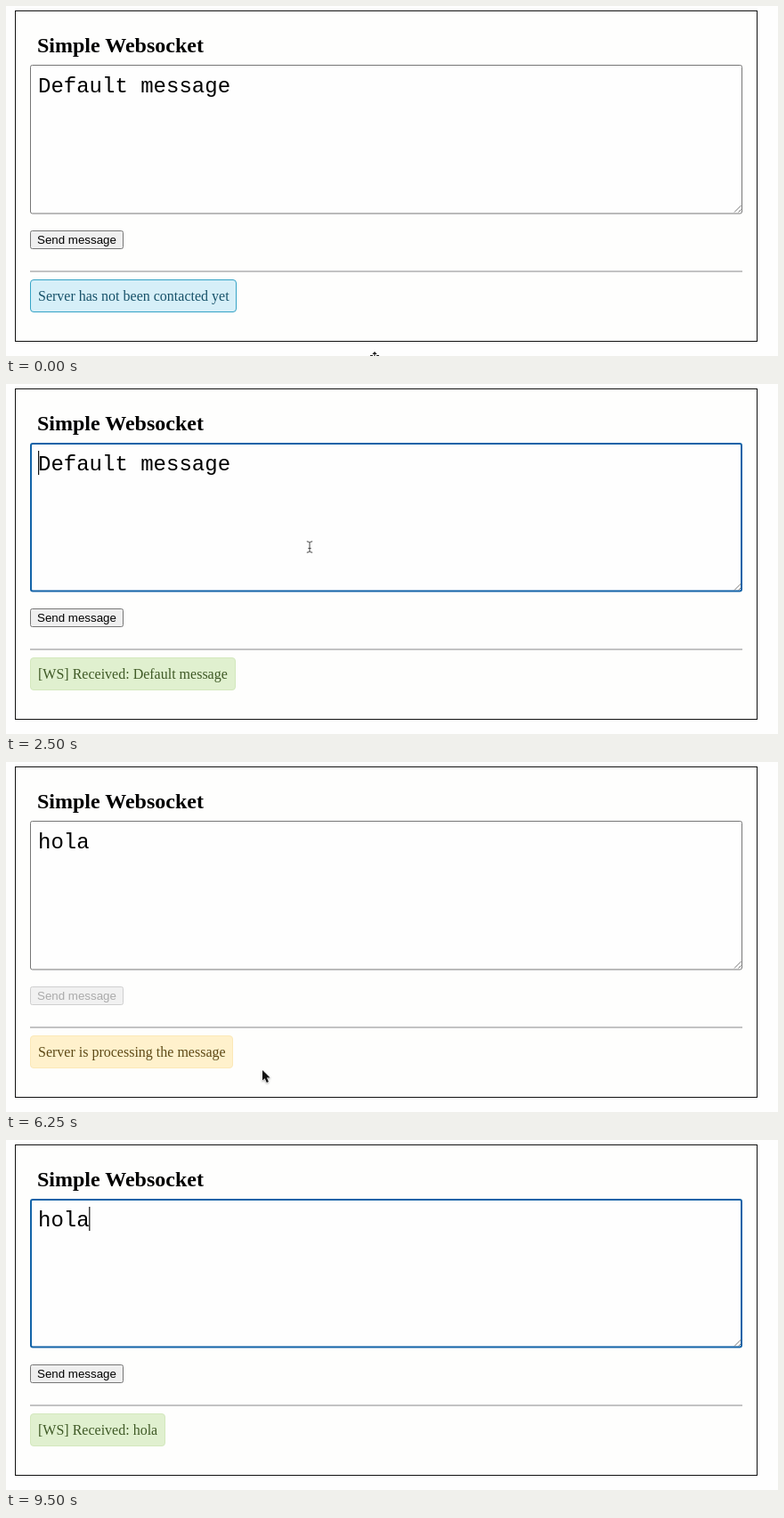
These frames come from a looping animation (867 by 393 pixels, 10000 ms). An HTML page:

```html
<!DOCTYPE html>
<html lang="en">
<head>
<meta charset="utf-8">
<title>Simple Websocket</title>
<style>
  html, body { margin: 0; width: 100%; height: 100%; overflow: hidden; background: #fefefe; }
  svg { display: block; width: 867px; height: 393px; }
  text { white-space: pre; }
  .serif { font-family: "Liberation Serif", Times, serif; }
  .mono { font: 24px "Liberation Mono", "Courier New", monospace; }
  .sans { font: 13.333px "Liberation Sans", Arial, sans-serif; }
</style>
</head>
<body>
<svg viewBox="0 0 867 393">
  <rect width="867" height="393" fill="#fefefe"/>
  <rect x="10.5" y="5.5" width="833" height="371" fill="#fefefd" stroke="#111"/>
  <text class="serif" x="35" y="52" font-size="24" font-weight="bold">Simple Websocket</text>

  <rect id="area" fill="#fefefe"/>
  <path d="M818 231.5L825.5 224M822.5 231.5L825.5 228.5" stroke="#777" fill="none"/>
  <rect id="selection" x="36" y="75" width="216" height="27" fill="#b3d7ff"/>
  <text id="message" class="mono" x="36" y="97"></text>
  <rect id="caret" y="75" width="1.2" height="27" fill="#111"/>

  <rect id="button" x="27.5" y="252.5" width="104" height="20" rx="2"/>
  <text id="label" class="sans" x="35" y="267">Send message</text>

  <rect x="27" y="297" width="800" height="2" fill="#c3c3c3"/>
  <rect id="box" x="27.5" y="307.5" height="36" rx="3.5"/>
  <text id="status" class="serif" x="36" y="331" font-size="16"></text>

  <g id="resize" fill="none" stroke="#222" stroke-width="1.2">
    <path d="M414 389V393M409 392.5H412M416 392.5H419"/>
    <path d="M411.3 391L414 388L416.7 391Z" fill="#222" stroke="none"/>
  </g>
  <path id="arrow" d="M0 0V11.6L2.7 9.2L4.8 14L6.9 13.1L4.9 8.4H8.6Z"
        fill="#111" stroke="#fff" stroke-width="1" paint-order="stroke"
        style="filter:drop-shadow(0 1px 1px #0005)"/>
  <path id="beam" d="M-3.2 -6.2Q0 -6.2 0 -4.5Q0 -6.2 3.2 -6.2M0 -4.5V4.5M-3.2 6.2Q0 6.2 0 4.5Q0 6.2 3.2 6.2M-1.6 1.5H1.6"
        fill="none" stroke="#444" stroke-width="1"/>
</svg>
<script>
const LOOP = 10000, STEP = 250;
const $ = id => document.getElementById(id);

// Pointer path: time, x, y
const path = [
  [250, 396, 372], [500, 240, 318], [750, 66, 265], [1000, 62, 263], [1250, 62, 263],
  [1500, 184, 217], [1750, 275, 193], [2250, 341, 183], [4000, 341, 183],
  [4250, 320, 190], [4500, 180, 222], [4750, 64, 261], [5000, 62, 263],
  [5250, 92, 286], [5500, 200, 329], [5750, 270, 345], [6000, 289, 347],
  [6500, 287, 345], [7000, 285, 346], [7250, 285, 346], [7500, 283, 347], [7750, 280, 349]
];

const states = {
  idle: { text: "Server has not been contacted yet", width: 231, fill: "#d6eff8", stroke: "#35a3c6", ink: "#17526a" },
  busy: { text: "Server is processing the message", width: 227, fill: "#fff1cc", stroke: "#fbe8b8", ink: "#5e4a16" },
  first: { text: "[WS] Received: Default message", width: 230, fill: "#e0f0cf", stroke: "#d3e8bd", ink: "#3f5a26" },
  second: { text: "[WS] Received: hola", width: 151, fill: "#e0f0cf", stroke: "#d3e8bd", ink: "#3f5a26" }
};

function set(id, attrs) {
  for (const k in attrs) $(id).setAttribute(k, attrs[k]);
}

function show(id, on) {
  $(id).style.display = on ? "" : "none";
}

function pointer(t) {
  if (t < path[0][0] || t >= 8000) return null;
  const i = path.findIndex(p => p[0] > t);
  if (i < 0) return path[path.length - 1].slice(1);
  const [t0, x0, y0] = path[i - 1], [t1, x1, y1] = path[i];
  const k = (t - t0) / (t1 - t0);
  return [x0 + (x1 - x0) * k, y0 + (y1 - y0) * k];
}

function stateAt(t) {
  if (t < 1000) return "idle";
  if (t < 2500) return "busy";
  if (t < 5000) return "first";
  return t < 6500 ? "busy" : "second";
}

function messageAt(t) {
  if (t < 3750) return "Default message";
  return t < 4000 ? "ho" : "hola";
}

function caretOn(t, focused) {
  if (!focused || t === 3500) return false;
  if (t >= 3750 && t < 4500) return true;
  return Math.floor((t - 2500) / 500) % 2 === 0;
}

function draw(time) {
  const t = Math.floor((time % LOOP) / STEP) * STEP;
  const state = stateAt(t), s = states[state], busy = state === "busy";
  const focused = state === "first" || state === "second";
  const pos = pointer(t), [x, y] = pos || [0, 0];
  const overArea = pos && x > 27 && x < 827 && y > 66 && y < 233;
  const overButton = pos && x > 27 && x < 132 && y > 252 && y < 273;

  set("area", focused
    ? { x: 28, y: 67, width: 798, height: 165.5, rx: 2, stroke: "#1263a8", "stroke-width": 2 }
    : { x: 27.5, y: 66.5, width: 799, height: 166.5, rx: 2, stroke: overArea ? "#4f4f4f" : "#767676", "stroke-width": 1 });

  const message = messageAt(t);
  $("message").textContent = message;
  show("selection", t === 3500);
  show("caret", caretOn(t, focused));
  set("caret", { x: t < 3500 ? 36 : 35.6 + message.length * 14.4 });

  set("button", busy
    ? { fill: "#f1f1f1", stroke: "#cfcfcf" }
    : { fill: overButton ? "#e5e5e5" : "#efefef", stroke: "#767676" });
  set("label", { fill: busy ? "#aaa" : "#000" });

  set("box", { width: s.width, fill: s.fill, stroke: s.stroke });
  set("status", { fill: s.ink });
  $("status").textContent = s.text;

  show("resize", t < 250);
  show("arrow", pos && !overArea);
  show("beam", overArea);
  const move = { transform: `translate(${x} ${y})` };
  set("arrow", move);
  set("beam", move);
}

const start = performance.now();
function tick() {
  draw(performance.now() - start);
  requestAnimationFrame(tick);
}
tick();
</script>
</body>
</html>
```
